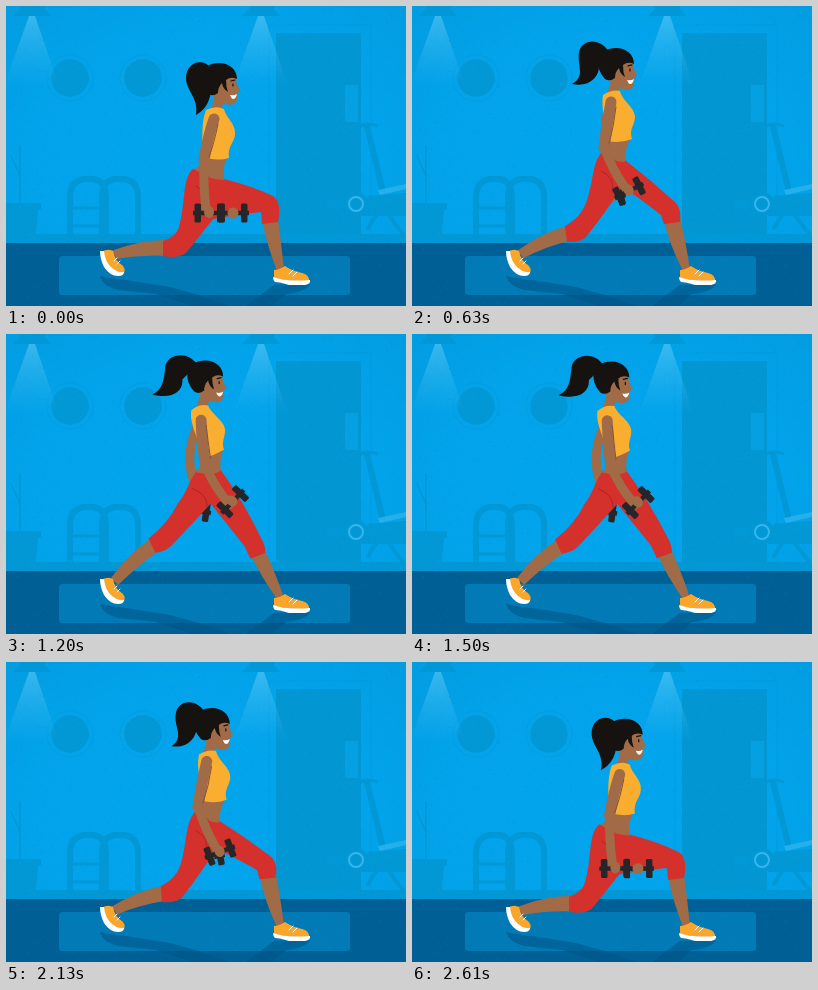
An HTML page for the animation above (2.64 s loop, 400 by 300 pixels).

```html
<!DOCTYPE html>
<html lang="en">
<head>
<meta charset="utf-8">
<title>Split squat</title>
<style>
  html, body { margin: 0; width: 100%; height: 100%; overflow: hidden; background: #02a3ea; }
  svg { display: block; width: 100%; height: 100%; }
  .line { fill: none; stroke-linecap: round; stroke-linejoin: round; }
  .skin { fill: #a06b46; }
  .skin.line { fill: none; stroke: #a06b46; }
  .pants { fill: #d5312c; }
  .hair { fill: #15120f; }
  .dim { fill: #0297d5; }
  .dim.line { fill: none; stroke: #0297d5; }
</style>
</head>
<body>
<svg viewBox="0 0 400 300">
  <defs>
    <radialGradient id="wall" cx=".5" cy=".5" r=".75">
      <stop offset="0" stop-color="#02a5ed"/>
      <stop offset=".6" stop-color="#02a3ea"/>
      <stop offset="1" stop-color="#039bdf"/>
    </radialGradient>
    <linearGradient id="beam" x2="0" y2="1">
      <stop offset="0" stop-color="#6fd0f8" stop-opacity=".5"/>
      <stop offset="1" stop-color="#4cc2f5" stop-opacity="0"/>
    </linearGradient>
    <g id="lamp">
      <path fill="url(#beam)" d="M-2 10H4L28 80H-27Z"/>
      <path class="dim" d="M-11 0H14V3L20 10H-18L-11 3Z" opacity=".8"/>
    </g>
    <g id="porthole">
      <circle r="23" fill="none" stroke="#0297d5" stroke-opacity=".5"/>
      <circle class="dim" r="18.7"/>
    </g>
    <g id="bell" fill="#26262a">
      <path d="M-16 -2.2H16V2.2H-16Z"/>
      <rect x="-14.5" y="-9.5" width="6.5" height="19" rx="1.5"/>
      <rect x="8" y="-9.5" width="6.5" height="19" rx="1.5"/>
    </g>
  </defs>

  <rect width="400" height="300" fill="url(#wall)"/>
  <use href="#porthole" x="64" y="72"/>
  <use href="#porthole" x="137" y="72"/>
  <path class="dim line" d="M263 228V19H365V228" opacity=".5"/>
  <path fill="#0296d3" d="M270 27H355V228H270Z"/>
  <path fill="#04a0e2" d="M339 79H352V116H339Z"/>
  <use href="#lamp" x="25"/>
  <use href="#lamp" x="254"/>
  <path class="dim" d="M0 228H400V238H0Z"/>

  <g class="dim line" stroke-width="6">
    <path d="M64 229V192Q64 173 81 173H86Q99 173 100 192V229"/>
    <path d="M96 229V192Q96 173 111 173H116Q132 173 132 192V229"/>
    <path d="M65 202H97M65 220H97" stroke-width="3"/>
  </g>
  <path class="dim" d="M0 197H35V204H32L29 236H0Z"/>
  <path class="dim line" stroke-width="1.5" d="M14 140V196M14 170L5 150"/>

  <g class="dim line">
    <path stroke-width="6" d="M361 120L376 182"/>
    <path stroke-width="3" d="M351 123Q360 115 371 120"/>
    <path stroke-width="4" d="M362 222L376 200L400 232"/>
  </g>
  <path class="dim" d="M322 194H345V203H322ZM362 190L400 187V210H356Z"/>
  <circle class="dim" cx="350" cy="198" r="12"/>
  <circle cx="350" cy="198" r="7" fill="none" stroke="#35b6ee" stroke-width="2"/>
  <path fill="#35b6ee" opacity=".7" d="M372 184L400 178V183L374 189Z"/>

  <path fill="#005f95" d="M0 237H400V300H0Z"/>
  <rect x="53" y="250" width="291" height="39" rx="3" fill="#027ab5"/>
  <path id="grain" class="line" stroke="#0479b8" opacity=".2"/>
  <path id="glints" class="line" stroke="#4fc0f2" opacity=".14"/>

  <g fill="#005585" opacity=".55">
    <path d="M94 270Q108 273 120 274L164 281L196 290L224 300H186L150 288L112 284Q97 280 94 270Z"/>
    <path d="M268 279L304 278Q300 286 280 288L266 300H240Z"/>
  </g>

  <path id="farArm" class="skin line" stroke-width="9"/>
  <path id="frontShin" class="skin"/>
  <path id="rearShin" class="skin"/>
  <path id="frontLeg" class="pants"/>
  <g id="farBell"><use href="#bell"/><circle class="skin" r="5.5"/></g>
  <path id="belly" class="skin"/>
  <path id="rearLeg" class="pants"/>
  <path id="seam" class="line" stroke="#ad2428" stroke-width="1"/>

  <g>
    <path fill="#f9a62b" d="M96 246Q101 242 107 245Q109 255 116 259Q120 263 118 267L108 267L98 256Z"/>
    <path fill="#fff" d="M94 245L98 245Q99 256 106 262Q112 267 118 266Q118 270 112 270Q104 270 98 261Q94 253 94 245Z"/>
    <path class="line" stroke="#fff" stroke-width="1" d="M108 255L111 252M111 258L114 255"/>
    <path fill="#f9a62b" d="M268 264Q273 264 279 260Q286 265 296 267Q304 269 303 276L268 273Z"/>
    <path fill="#fff" d="M267 271Q280 276 304 274Q305 278 299 279H283Q274 276 269 276Q267 274 267 271Z"/>
    <path class="line" stroke="#fff" stroke-width="1" d="M283 268L287 264M287 270L291 266"/>
  </g>

  <path id="neck" class="skin line" stroke-width="10"/>
  <path id="shirt" fill="#f9ae30"/>
  <path id="tail" class="hair"/>
  <g id="head">
    <path class="skin" d="M203 70L229 66Q230 76 234 82Q233 84 231 85Q232 90 230 94Q227 98 220 96Q211 94 207 88Z"/>
    <path class="hair" d="M202 86C190 72 194 55 213 55C224 55 231 62 231 71Q225 68 220 72Q220 79 222 84Q217 81 216 75Q212 79 212 85Q207 89 202 86Z"/>
    <path class="line" stroke="#15120f" stroke-width="1.2" d="M225 73L229 72M227 76V78"/>
    <path fill="#fff" d="M224 87Q228 88 231 86Q230 91 227 91Q225 90 224 87Z"/>
  </g>
  <path id="upperArm" class="skin line" stroke-width="11"/>
  <path id="forearm" class="skin line" stroke-width="9"/>
  <path id="crease" class="line" stroke="#855433" stroke-width="1"/>
  <g id="nearBell"><use href="#bell"/><ellipse class="skin" rx="5" ry="6" cy="-1"/></g>
</svg>

<script>
const LOOP = 2640, MID = 0.55;

// Each part: lowest, middle and highest pose of the squat.
const paths = {
  farArm: [
    'M208 113 Q203 160 226 204',
    'M197 98 Q187 144 202 186',
    'M193 88 Q173 128 195 160'],
  frontShin: [
    'M256 214 L272 213 Q275 235 278 264 L271 265 Q260 236 256 214Z',
    'M252 214 L268 212 Q274 236 278 264 L271 265 Q257 238 252 214Z',
    'M244 220 L258 216 Q269 238 278 264 L271 265 Q255 243 244 220Z'],
  rearShin: [
    'M160 234 L160 250 Q132 249 111 253 L105 245 Q134 234 160 234Z',
    'M155 220 L157 235 Q132 241 112 252 L105 245 Q129 227 155 220Z',
    'M143 205 L150 218 Q132 231 112 251 L105 244 Q121 221 143 205Z'],
  frontLeg: [
    'M188 163 Q202 172 218 173 Q246 180 267 190 Q276 196 272 216 L256 218 L255 206 Q230 209 202 214 L183 190Z',
    'M189 147 Q201 155 213 154 Q239 174 264 197 Q270 204 268 216 L252 218 L249 209 Q232 195 209 180 L186 168Z',
    'M190 136 Q204 142 214 134 Q238 168 255 205 Q259 212 259 219 L244 225 L238 212 Q222 192 204 169 L186 156Z'],
  belly: [
    'M197 148 L222 149 Q216 160 218 174 Q202 174 188 164 Q197 158 197 148Z',
    'M197 131 L219 131 Q213 142 213 156 Q201 156 188 149 Q197 143 197 131Z',
    'M198 118 L218 113 Q213 124 215 136 Q204 143 189 138 Q199 130 198 118Z'],
  rearLeg: [
    'M187 163 C176 172 180 196 173 221 Q170 231 157 235 L157 250 Q171 253 180 247 Q196 227 212 207 Q222 188 202 170Z',
    'M189 147 C180 158 181 178 175 194 Q170 211 153 220 L155 236 Q168 237 174 231 Q191 210 210 181 Q214 166 202 153Z',
    'M190 138 C183 146 182 156 172 168 Q162 188 142 204 L149 218 Q159 217 165 211 Q185 190 205 169 Q212 152 203 140Z'],
  seam: [
    'M190 180 Q204 187 198 204',
    'M189 165 Q204 172 200 186',
    'M186 154 Q202 160 201 172'],
  neck: [
    'M209 107 L214 90',
    'M200 89 L205 73',
    'M194 77 L200 60'],
  shirt: [
    'M200 104 Q210 99 218 103 C220 112 230 118 229 128 C229 136 221 140 223 152 Q210 156 195 150 C198 135 194 120 200 104Z',
    'M191 89 Q200 83 208 85 C210 95 224 102 223 112 C222 120 217 124 220 133 Q208 138 195 135 C197 120 188 105 191 89Z',
    'M185 76 Q193 69 202 71 C205 80 219 86 219 96 C219 103 215 108 218 115 Q208 121 197 124 C195 107 183 92 185 76Z'],
  tail: [
    'M205 62 C196 51 180 57 180 72 C180 85 193 92 190 109 C203 102 207 88 204 72Z',
    'M197 46 C188 31 169 33 167 47 C165 60 174 70 160 78 C178 82 188 70 187 59 C186 53 190 50 198 58Z',
    'M191 30 C181 15 161 20 159 32 C158 45 156 55 146 60 C166 65 177 57 176 45 C178 37 183 36 191 43Z'],
  upperArm: [
    'M208 113 Q202 130 198 154',
    'M199 96 Q195 118 192 142',
    'M195 86 Q196 108 200 132'],
  forearm: [
    'M198 152 Q197 178 200 203',
    'M192 141 Q200 164 214 183',
    'M200 131 Q208 152 224 170'],
  crease: [
    'M212 118 Q208 138 203 151',
    'M204 101 Q202 120 197 138',
    'M200 91 Q202 106 205 124']
};
const transforms = {
  head: ['translate(0 2)', 'translate(-9 -13)', 'translate(-14 -29)'],
  farBell: ['translate(227 207) rotate(0)', 'translate(198 192) rotate(-10)', 'translate(189 176) rotate(10)'],
  nearBell: ['translate(203 207) rotate(0)', 'translate(217 185) rotate(-27)', 'translate(227 167) rotate(-47)']
};

const number = /-?\d+/g;
const track = attr => ([id, poses]) => ({
  el: document.getElementById(id),
  attr,
  shape: poses[0],
  values: poses.map(pose => pose.match(number).map(Number))
});
const tracks = [
  ...Object.entries(paths).map(track('d')),
  ...Object.entries(transforms).map(track('transform'))
];

// Quadratic through the three poses; lift runs from 0 to 1.
function pose(lift) {
  const low = (lift - MID) * (lift - 1) / MID;
  const mid = lift * (lift - 1) / (MID * (MID - 1));
  const high = lift * (lift - MID) / (1 - MID);
  for (const { el, attr, shape, values: [a, b, c] } of tracks) {
    let i = 0;
    el.setAttribute(attr, shape.replace(number, () => {
      const v = a[i] * low + b[i] * mid + c[i] * high;
      i++;
      return v.toFixed(2);
    }));
  }
}

let seed = 7;
const random = () => (seed = seed * 16807 % 2147483647) / 2147483647;
const specks = count => Array.from({ length: count }, () =>
  `M${(random() * 400).toFixed(1)} ${(random() * 300).toFixed(1)}h.1`).join('');
document.getElementById('grain').setAttribute('d', specks(2200));
document.getElementById('glints').setAttribute('d', specks(1100));

function frame(now) {
  const s = Math.sin(Math.PI * (now % LOOP) / LOOP);
  pose(0.4 * s + 0.6 * s * s);
  requestAnimationFrame(frame);
}
frame(performance.now());
</script>
</body>
</html>
```
